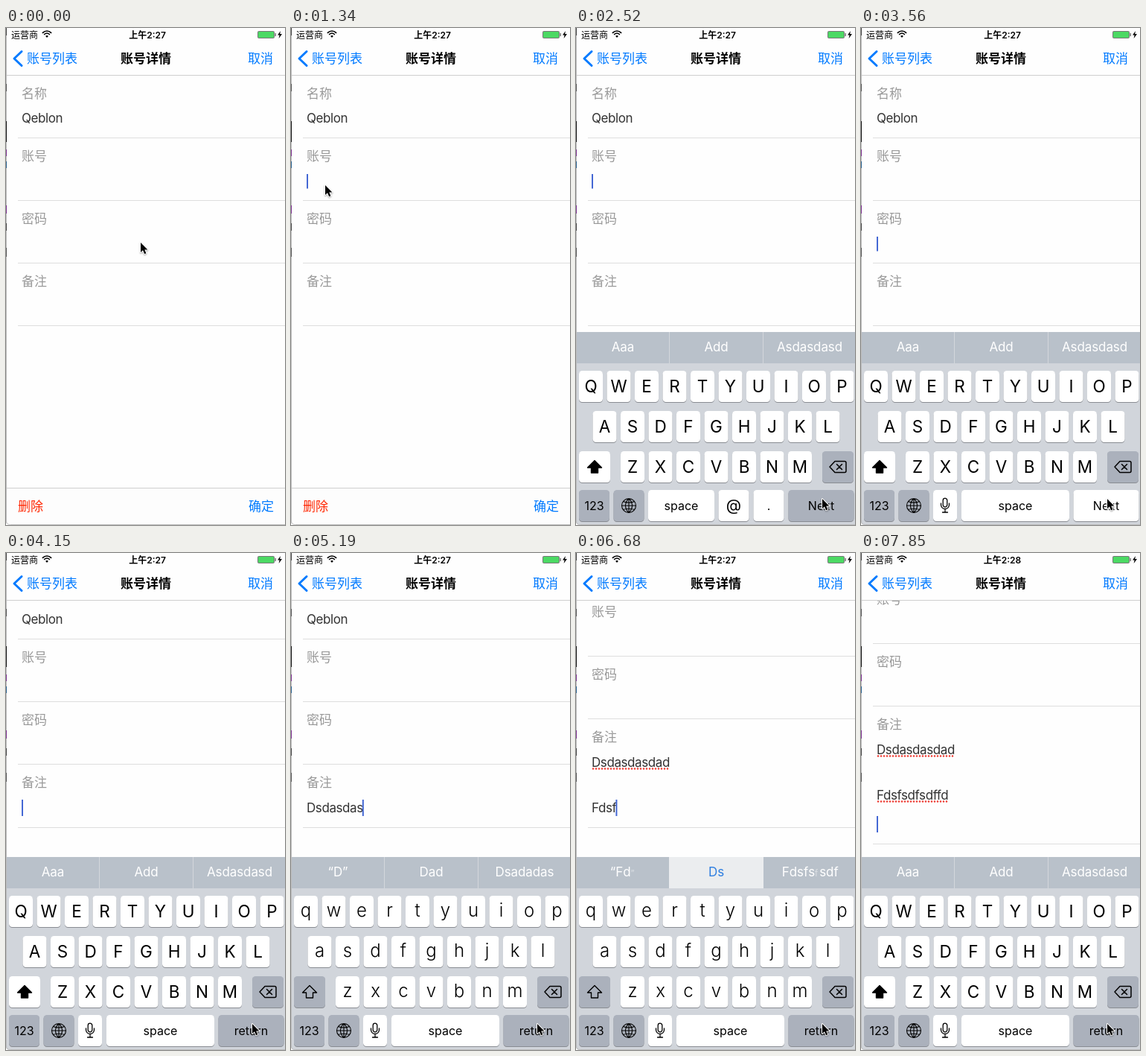
Animation of 375 by 667 pixels, one loop 8 s. Source, as an HTML page with a canvas:

```html
<!DOCTYPE html>
<html lang="zh">
<head>
<meta charset="utf-8">
<style>
html, body { margin: 0; width: 100%; height: 100%; overflow: hidden; background: #fefefe; }
canvas { display: block; width: 375px; height: 667px; }
</style>
</head>
<body>
<canvas id="stage"></canvas>
<script>
const W = 375, H = 667, LOOP = 8000, TICK = 148.2;
const BLUE = '#007aff', KEY_GRAY = '#abb1bc';
const FONT = 'Inter, "Noto Sans CJK SC", "Noto Sans CJK", sans-serif';
const canvas = document.getElementById('stage');
const ctx = canvas.getContext('2d');
const dpr = window.devicePixelRatio || 1;
canvas.width = W * dpr;
canvas.height = H * dpr;

const clamp = v => Math.max(0, Math.min(1, v));
const smooth = p => p * p * (3 - 2 * p);

// Interpolates [time, value] pairs, holding the value at both ends.
function at(t, keys, ease = p => p) {
  if (t <= keys[0][0]) return keys[0][1];
  for (let i = 1; i < keys.length; i++) {
    const [t0, v0] = keys[i - 1], [t1, v1] = keys[i];
    if (t <= t1) return v0 + (v1 - v0) * ease((t - t0) / (t1 - t0));
  }
  return keys[keys.length - 1][1];
}

function setFont(size, weight = 400, track = 0) {
  ctx.font = `${weight} ${size}px ${FONT}`;
  ctx.letterSpacing = track + 'px';
}

function text(str, x, y, { size = 17, color = '#000', weight = 400, align = 'left', track = 0 } = {}) {
  setFont(size, weight, track);
  ctx.fillStyle = color;
  ctx.textAlign = align;
  ctx.fillText(str, x, y);
}

function rect(x, y, w, h, color) {
  ctx.fillStyle = color;
  ctx.fillRect(x, y, w, h);
}

function roundRect(x, y, w, h, r, color) {
  ctx.beginPath();
  ctx.roundRect(x, y, w, h, r);
  ctx.fillStyle = color;
  ctx.fill();
}

function path(d, x, y, { fill, stroke, width = 1.5 }) {
  ctx.save();
  ctx.translate(x, y);
  const shape = new Path2D(d);
  ctx.lineJoin = ctx.lineCap = 'round';
  if (stroke) {
    ctx.strokeStyle = stroke;
    ctx.lineWidth = width;
    ctx.stroke(shape);
  }
  if (fill) {
    ctx.fillStyle = fill;
    ctx.fill(shape);
  }
  ctx.restore();
}

const typed = (word, k, start, rate) => word.slice(0, Math.max(0, Math.ceil((k - start) * rate)));

function stateAt(k) {
  const typingFirst = k >= 31 && k <= 38, typingSecond = k >= 43 && k <= 51;
  const grow = k >= 52 ? 100 : k >= 41 ? 61 : k >= 39 ? 30.5 : 0;
  return {
    k, grow, typingFirst, typingSecond,
    scroll: at(k, [[26, 0], [28, 32], [39, 32], [41, 62.5], [43, 93], [52, 93], [53, 110]]),
    slide: at(k, [[9, 259], [10, 110], [11, 21], [12, 0]]),
    first: typed('Dsdasdasdad', k, 30, 1.5),
    second: typed('Fdsfsdfsdffd', k, 42, 1.3),
    field: k < 9 ? -1 : k < 22 ? 1 : k < 26 ? 2 : 3,
    caretOn: ![14, 15, 21].includes(k),
    lower: typingFirst || typingSecond,
    nextPressed: k === 20 || k === 24 || k === 25,
    clock: k < 50 ? '上午2:27' : '上午2:28',
    mouseX: at(k, [[3, 181], [8, 46], [11, 46], [17, 331]], smooth),
    mouseY: at(k, [[3, 288], [8, 211], [11, 211], [17, 632]], smooth)
  };
}

function noteLine(str, y, misspelled) {
  text(str, 21, y, { color: '#333', track: -.41 });
  const width = ctx.measureText(str).width;
  if (misspelled) {
    ctx.save();
    ctx.beginPath();
    ctx.setLineDash([0, 4]);
    ctx.lineCap = 'round';
    ctx.lineWidth = 2.6;
    ctx.strokeStyle = '#ee3b32';
    ctx.moveTo(23, y + 2.5);
    ctx.lineTo(20 + width, y + 2.5);
    ctx.stroke();
    ctx.restore();
  }
  return width;
}

function drawForm(s) {
  ctx.save();
  ctx.translate(0, -s.scroll);
  ['名称', '账号', '密码', '备注'].forEach((label, i) => {
    text(label, 21, 93.5 + 84 * i, { color: '#999' });
    const bottom = i < 3 ? 147 + 84 * i : s.k < 28 ? 399 : 400 + s.grow;
    rect(16, bottom, W - 16, 1, '#dedede');
  });
  text('Qeblon', 21, 127, { color: '#333', track: -.41 });
  const firstWidth = noteLine(s.first, 380, s.k >= 39);
  const secondWidth = noteLine(s.second, 441, s.k >= 52);
  if (s.field > 0 && s.caretOn) {
    const width = s.typingFirst ? firstWidth : s.typingSecond ? secondWidth : 0;
    const inNotes = s.field === 3;
    rect(width ? 20 + width : 21, inNotes ? 363 + s.grow : 112 + 84 * s.field,
      2, inNotes ? 22 : 19.5, '#4468d4');
  }
  ctx.restore();
}

function drawBars(s) {
  rect(0, 0, W, 63, '#fefefe');
  rect(0, 63, W, 1, '#cfcfcf');
  text('运营商', 7, 13.5, { size: 12 });
  path('M-5.6 -5.2A8 8 0 0 1 5.6 -5.2M-3.4 -3A5 5 0 0 1 3.4 -3', 55, 11.5, { stroke: '#000', width: 1.7 });
  path('M-2 -1.2A3 3 0 0 1 2 -1.2L0 1Z', 55, 12, { fill: '#000' });
  text(s.clock, 190, 13.5, { size: 12, weight: 600, align: 'center' });
  roundRect(338, 4, 23, 10, 2, '#777');
  roundRect(339, 5, 21, 8, 1, '#4cd964');
  rect(361.5, 7, 1.5, 4, '#777');
  path('M4 0L0 5.6H2.6L1.6 10L6 4H3.2Z', 365, 4, { fill: '#000' });

  path('M10 0L0 9.5L10 19', 11, 31.5, { stroke: BLUE, width: 3 });
  text('账号列表', 28, 47, { color: BLUE });
  text('账号详情', 188, 47, { weight: 600, align: 'center' });
  text('取消', 325, 47, { color: BLUE });
}

function drawToolbar() {
  rect(0, 617, W, 50, '#fdfdfd');
  rect(0, 617, W, 1, '#cfcfcf');
  text('删除', 16, 648, { color: '#ff2600' });
  text('确定', 326, 648, { color: BLUE });
}

function key(x, y, w, color = '#fff') {
  roundRect(x, y + 1, w, 42, 4.5, '#898c92');
  roundRect(x, y, w, 42, 4.5, color);
}

function labelKey(label, x, w, color, size = 16) {
  key(x, 620, w, color);
  text(label, x + w / 2, size > 16 ? 648 : 646.5, { size, align: 'center' });
}

// Draws a centred word; strength(i) scales and fades each letter.
function suggestion(word, x, color, strength) {
  setFont(17, 400, -.1);
  let left = x - ctx.measureText(word).width / 2;
  [...word].forEach((letter, i) => {
    const amount = strength(i);
    setFont(17, 400, -.1);
    const advance = ctx.measureText(letter).width;
    ctx.globalAlpha = amount;
    text(letter, left, 433.5, { size: 17 * (.35 + .65 * amount), color });
    ctx.globalAlpha = 1;
    left += advance;
  });
}

function drawSuggestions(s) {
  const highlight = s.typingSecond && s.k >= 44;
  const words = highlight ? ['“Fd”', 'Ds', 'Fdsfsfsdf']
    : s.typingFirst && s.k >= 33 ? ['“D”', 'Dad', 'Dsadadas']
    : ['Aaa', 'Add', 'Asdasdasd'];
  rect(0, 408, W, 42, '#b9c1ca');
  if (highlight) rect(125, 408, 127, 42, '#ebedef');
  else [125, 251].forEach(x => rect(x, 408, 1, 42, '#d3d7dc'));
  const shown = [.5, 2, 4], fading = [3, -1, 5];
  words.forEach((word, n) => {
    const strength = i => s.k < 12 ? clamp(1 - (i - shown[n]) * .2)
      : s.k === 45 && i === fading[n] ? .5 : 1;
    suggestion(word, [63, 188.5, 314][n], highlight && n === 1 ? '#2f7fe0' : '#fff', strength);
  });
}

function drawKeyboard(s) {
  ctx.save();
  ctx.translate(0, s.slide);
  rect(0, 408, W, 259, '#d1d5db');
  drawSuggestions(s);

  [['QWERTYUIOP', 4], ['ASDFGHJKL', 22.5], ['ZXCVBNM', 60]].forEach(([letters, x0], row) => {
    const y = 460 + 54 * row;
    [...letters].forEach((letter, i) => {
      const x = x0 + 37.5 * i;
      key(x, y, 32);
      if (s.lower) text(letter.toLowerCase(), x + 16, y + 27.5, { size: 24, weight: 300, align: 'center' });
      else text(letter, x + 16, y + 29, { size: 22.5, align: 'center' });
    });
  });

  key(4, 568, 42, s.lower ? KEY_GRAY : '#fff');
  path('M0 -8.5L9.5 1H4.5V8H-4.5V1H-9.5Z', 25, 589, { stroke: '#000', width: 1.4, fill: s.lower ? null : '#000' });
  key(331, 568, 42, KEY_GRAY);
  path('M-11 0L-4 -7.5H9Q11 -7.5 11 -5.5V5.5Q11 7.5 9 7.5H-4ZM-1.5 -3.5L5.5 3.5M5.5 -3.5L-1.5 3.5',
    352, 589, { stroke: '#000', width: 1.5 });

  labelKey('123', 4, 41, KEY_GRAY);
  key(50.5, 620, 41, KEY_GRAY);
  path('M-9.5 0A9.5 9.5 0 1 0 9.5 0A9.5 9.5 0 1 0 -9.5 0ZH9.5M0 -9.5V9.5' +
    'M0 -9.5C-6 -4 -6 4 0 9.5C6 4 6 -4 0 -9.5M-7.5 -5.5Q0 -2.5 7.5 -5.5M-7.5 5.5Q0 2.5 7.5 5.5',
    71, 641, { stroke: '#000', width: 1.1 });
  if (s.k < 22) {
    labelKey('space', 97, 89);
    labelKey('@', 191.5, 41, '#fff', 21);
    labelKey('.', 238.5, 41);
  } else {
    key(97, 620, 32);
    path('M-2.8 -7A2.8 2.8 0 0 1 2.8 -7V-1A2.8 2.8 0 0 1 -2.8 -1Z' +
      'M-5.5 -3V-1A5.5 5.5 0 0 0 5.5 -1V-3M0 4.5V9M-3.5 9H3.5', 113, 641, { stroke: '#000', width: 1.3 });
    labelKey('space', 135, 145);
  }
  labelKey(s.k < 26 ? 'Next' : 'return', 285.5, 88, s.nextPressed ? '#fff' : KEY_GRAY);
  ctx.restore();
}

// Window edge with slivers of the desktop behind it.
function drawEdge() {
  rect(0, 0, 1, H, '#bcbcbc');
  [[0, 10, '#444'], [75, 10, '#555'], [125, 28, '#111'], [163, 9, '#7b2f8f'], [179, 9, '#27618f'],
    [238, 11, '#7b2f8f'], [262, 10, '#444'], [295, 12, '#555']]
    .forEach(([y, h, color]) => rect(0, y, 1, h, color));
  path('M0 0Q0 5 5 5H0Z', 0, 662, { fill: '#fff' });
  path('M0 0Q0 4.5 5 4.5H375', .5, 662, { stroke: '#bcbcbc', width: 1 });
}

function drawMouse(x, y) {
  ctx.save();
  ctx.shadowColor = 'rgba(0,0,0,.35)';
  ctx.shadowBlur = 2 * dpr;
  ctx.shadowOffsetY = dpr;
  path('M0 0V13L3 10.3L5.2 15.2L7.4 14.2L5.3 9.5H9.4Z', x, y, { stroke: '#fff', width: 2 });
  ctx.restore();
  path('M0 0V13L3 10.3L5.2 15.2L7.4 14.2L5.3 9.5H9.4Z', x, y, { fill: '#000' });
}

function draw(ms) {
  const s = stateAt(Math.min(53, Math.floor(ms / TICK + .08)));
  ctx.setTransform(dpr, 0, 0, dpr, 0, 0);
  rect(0, 0, W, H, '#fefefe');
  drawForm(s);
  drawBars(s);
  drawToolbar();
  if (s.slide < 259) drawKeyboard(s);
  drawEdge();
  drawMouse(s.mouseX, s.mouseY);
}

const start = performance.now();
function loop() {
  draw((performance.now() - start) % LOOP);
  requestAnimationFrame(loop);
}
loop();
</script>
</body>
</html>
```
